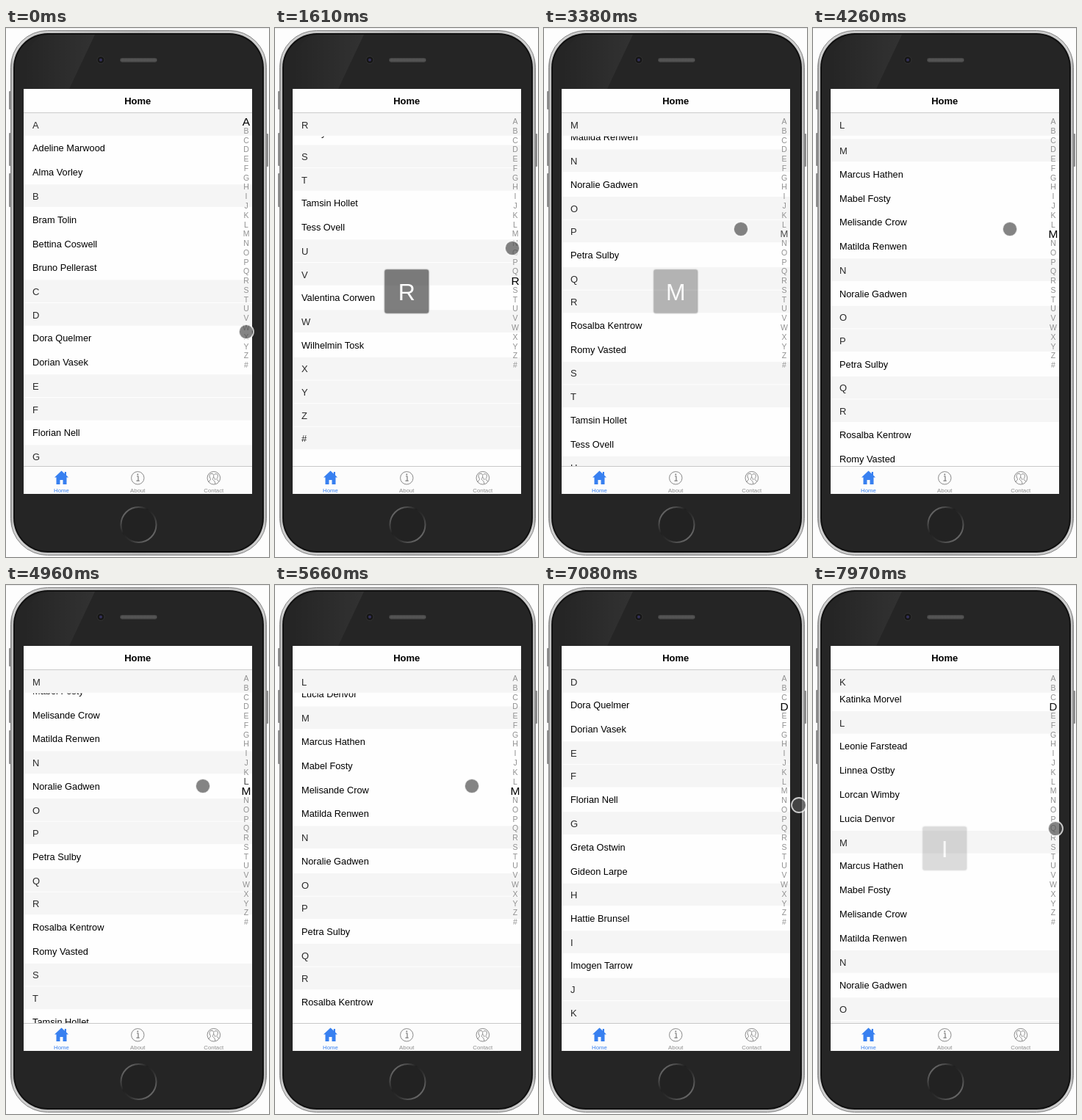
An HTML page for the animation above (8 s loop, 358 px wide and 721 px high).

```html
<!DOCTYPE html>
<html lang="en">
<head>
<meta charset="utf-8">
<title>Indexed contact list</title>
<style>
  html, body { margin: 0; width: 100%; height: 100%; overflow: hidden; background: #fdfdfd; }
  svg { display: block; font-family: "Liberation Sans", Arial, sans-serif; }
  .name { font-size: 12.8px; fill: #000; }
  .heading { font-size: 13px; fill: #2a2a2a; }
  .middle { text-anchor: middle; }
  .tab { font-size: 7.8px; fill: #8e8e8e; text-anchor: middle; }
  .icon { fill: none; stroke: #7c7c7c; stroke-width: .9; }
</style>
</head>
<body>
<svg width="358" height="721" viewBox="0 0 358 721">
  <defs>
    <linearGradient id="rim" x2="1" y2="0">
      <stop offset="0" stop-color="#969696"/><stop offset=".01" stop-color="#d0d0d0"/>
      <stop offset=".5" stop-color="#b4b4b4"/>
      <stop offset=".99" stop-color="#d0d0d0"/><stop offset="1" stop-color="#969696"/>
    </linearGradient>
    <linearGradient id="ring" x2="1" y2="1">
      <stop offset="0" stop-color="#8a8a8a"/><stop offset=".4" stop-color="#202020"/>
      <stop offset=".6" stop-color="#303030"/><stop offset="1" stop-color="#858585"/>
    </linearGradient>
    <linearGradient id="shine" x2="1" y2="0">
      <stop offset="0" stop-color="#fff" stop-opacity="0"/>
      <stop offset="1" stop-color="#fff" stop-opacity=".06"/>
    </linearGradient>
    <pattern id="mesh" width="2" height="2" patternUnits="userSpaceOnUse">
      <rect width="2" height="2" fill="#4a4a4a"/><rect width="1" height="1" fill="#6c6c6c"/>
    </pattern>
    <clipPath id="viewport"><rect x="24" y="116" width="311" height="481.5"/></clipPath>
  </defs>

  <!-- Phone -->
  <path d="M0 .5H358" stroke="#ececec"/>
  <g fill="#8d8d8d">
    <rect x="4" y="86" width="4" height="25" rx="1"/>
    <rect x="4" y="143" width="4" height="45" rx="1"/>
    <rect x="4" y="198" width="4" height="46" rx="1"/>
    <rect x="353" y="144" width="4" height="45" rx="1"/>
  </g>
  <rect x="6.5" y="3.5" width="348" height="715" rx="50" fill="url(#rim)" stroke="#858585"/>
  <rect x="10" y="7" width="341" height="708" rx="47" fill="#111"/>
  <rect x="12" y="9" width="337" height="704" rx="45" fill="#252525"/>
  <path d="M58 9H121L86 83H24V43Q34 13 58 9Z" fill="url(#shine)"/>
  <circle cx="129" cy="43.5" r="5" fill="#161616" stroke="#343434"/>
  <circle cx="129" cy="43.5" r="2" fill="#34315c"/>
  <rect x="155.5" y="41" width="50" height="5.5" rx="2.7" fill="url(#mesh)" stroke="#3c3c3c" stroke-width=".6"/>
  <circle cx="180.5" cy="677" r="24" fill="#222" stroke="url(#ring)" stroke-width="2"/>

  <!-- Screen -->
  <rect x="24" y="83" width="311" height="552" fill="#fefefe"/>
  <text class="middle" x="179.3" y="104" font-size="13" font-weight="bold">Home</text>
  <g clip-path="url(#viewport)">
    <g id="list"></g>
    <g id="sticky"></g>
    <g id="index"></g>
  </g>
  <path d="M24 115.5H335" stroke="#cbcbcb"/>
  <rect x="24" y="598" width="311" height="37" fill="#fcfcfc"/>
  <path d="M24 597.5H335" stroke="#c8c8c8"/>
  <path d="M75.5 603.5L66 612.5H68.5V622H73.5V616H77.5V622H82.5V612.5H85L82 609.6V605H79.8V607.5Z" fill="#3880f0"/>
  <text class="tab" x="75.5" y="633" style="fill:#3880f0">Home</text>
  <circle class="icon" cx="179.3" cy="613.3" r="8.7"/>
  <path d="M178 611H180V617M177.5 617.2H181.7" class="icon" style="stroke-width:1.2"/>
  <circle cx="179.3" cy="608.5" r="1" fill="#7c7c7c"/>
  <text class="tab" x="179.3" y="633">About</text>
  <g class="icon">
    <circle cx="282.8" cy="613.3" r="8.8"/>
    <path d="M276 619C276 616 279 617 278.4 614.5C276 611 277 607 280 607.3C283 607.3 283.6 611 281.4 614.5C281 617 284.5 616 284.7 621"/>
    <path d="M283.5 609C285 606.5 289 607.5 288.2 611.5C288 613.5 286.5 614 287 615.5C287.5 616.6 289 616.5 289.4 618M283.2 612.5C284 614 284.8 614 284.6 616"/>
  </g>
  <text class="tab" x="282.8" y="633">Contact</text>

  <g id="bubble">
    <rect x="148.5" y="328.5" width="61.5" height="61" rx="4" fill="#000" fill-opacity=".5" stroke="#e2e2e2" stroke-opacity=".75" stroke-width="1.6"/>
    <text class="middle" x="179.3" y="370.5" font-size="32" fill="#fff"></text>
  </g>
  <circle id="pointer" r="10" fill="#505050" fill-opacity=".7" stroke="#fff" stroke-opacity=".75" stroke-width="1.8"/>
</svg>

<script>
const LOOP = 8000, STEP = 177.1;
const TOP = 116, HEADING = 31.6, ROW = 32.85;
const LETTERS = [..."ABCDEFGHIJKLMNOPQRSTUVWXYZ#"];
const CONTACTS = [
  "Adeline Marwood", "Alma Vorley", "Bram Tolin", "Bettina Coswell", "Bruno Pellerast",
  "Dora Quelmer", "Dorian Vasek", "Florian Nell", "Greta Ostwin", "Gideon Larpe",
  "Hattie Brunsel", "Imogen Tarrow", "Katinka Morvel", "Leonie Farstead", "Linnea Ostby",
  "Lorcan Wimby", "Lucia Denvor", "Marcus Hathen", "Mabel Fosty", "Melisande Crow",
  "Matilda Renwen", "Noralie Gadwen", "Petra Sulby", "Rosalba Kentrow", "Romy Vasted",
  "Tamsin Hollet", "Tess Ovell", "Valentina Corwen", "Wilhelmin Tosk"
];

const $ = id => document.getElementById(id);
const clamp = v => Math.max(0, Math.min(1, v));

function add(parent, tag, attrs, text = "") {
  const node = document.createElementNS("http://www.w3.org/2000/svg", tag);
  for (const key in attrs) node.setAttribute(key, attrs[key]);
  node.textContent = text;
  return parent.appendChild(node);
}

function addHeading(parent, y, letter) {
  add(parent, "rect", { x: 24, y, width: 311, height: HEADING - 1, fill: "#f5f5f5" });
  return add(parent, "text", { class: "heading", x: 36, y: y + 20.6 }, letter);
}

// Build the sections and remember where each one starts.
const offset = {};
let contentY = 0;
for (const letter of LETTERS) {
  offset[letter] = contentY;
  addHeading($("list"), contentY, letter);
  contentY += HEADING;
  for (const name of CONTACTS.filter(n => n[0] === letter)) {
    add($("list"), "text", { class: "name", x: 36, y: contentY + 20.8 }, name);
    contentY += ROW;
  }
}
add($("sticky"), "rect", { x: 24, y: 0, width: 311, height: HEADING, fill: "#fefefe" });
const stickyLabel = addHeading($("sticky"), 0, "A");
const indexLabels = LETTERS.map(letter =>
  add($("index"), "text", { class: "middle", x: 327 }, letter));

// Tracks: [step, value, ...], linear between keys.
const { D, L, M, N, P, S } = offset;
const scrollTrack = [
  [5, 0], [7, S - 43.5], [10, S - 43.5], [11, P], [12, N], [17, N], [19, N - 49.5],
  [22, M], [25, L + 110], [28, N - 110.5], [30, N - 125], [34, N - 300],
  [37, N - 462], [40, D], [43, D], [45, N - 382]
];
const pointerTrack = [
  [0, 327, 414], [3, 329, 439], [5, 329, 439], [9, 323, 300], [13, 326, 235],
  [16, 268, 274], [37, 268, 274], [40, 347, 300], [42, 347, 310], [45, 330, 332]
];
const bubbleTrack = [[5, 0], [6, 1], [17, 1], [19, .53], [21, 0], [44, 0], [45, .27]];

// Highlighted index letters: [letter, from, to].
const highlights = [
  ["A", -2, 5], ["Z", 5, 6], ["V", 6, 7], ["R", 8, 10], ["P", 10, 10.9], ["N", 12, 16.5],
  ["M", 19, 24], ["L", 25, 27], ["M", 27, 34], ["L", 34.5, 35.8], ["K", 35.5, 36], ["D", 39, 44.8]
];

function sample(track, step, column = 1) {
  const next = track.findIndex(key => key[0] > step);
  if (next === 0) return track[0][column];
  if (next < 0) return track[track.length - 1][column];
  const a = track[next - 1], b = track[next];
  return a[column] + (b[column] - a[column]) * (step - a[0]) / (b[0] - a[0]);
}

function emphasis(letter, step) {
  return Math.max(0, ...highlights.filter(h => h[0] === letter && step >= h[1])
    .map(([, from, to]) => Math.min(clamp((step - from) / 2 + .5), clamp(1 - (step - to) / 2))));
}

function draw(step) {
  const scroll = sample(scrollTrack, step);
  $("list").setAttribute("transform", `translate(0 ${TOP - scroll})`);

  const current = LETTERS.filter(l => offset[l] <= scroll + .01).pop();
  const following = LETTERS[LETTERS.indexOf(current) + 1];
  const push = following ? Math.min(0, offset[following] - scroll - HEADING) : 0;
  stickyLabel.textContent = current;
  $("sticky").setAttribute("transform", `translate(0 ${TOP + push})`);

  indexLabels.forEach((label, i) => {
    const weight = emphasis(LETTERS[i], step);
    const size = 10.5 + 5 * weight;
    const shade = Math.round(145 * (1 - weight));
    label.setAttribute("font-size", size);
    label.setAttribute("fill", `rgb(${shade},${shade},${shade})`);
    label.setAttribute("y", 127.3 + i * 12.77 + size * .36);
  });

  const lastTouched = highlights.filter(h => h[1] <= step).pop()[0];
  $("bubble").setAttribute("opacity", sample(bubbleTrack, step));
  $("bubble").lastElementChild.textContent = step > 40 ? "I" : lastTouched;

  $("pointer").setAttribute("cx", sample(pointerTrack, step));
  $("pointer").setAttribute("cy", sample(pointerTrack, step, 2));
}

function tick() {
  const time = performance.now() % LOOP;
  draw(Math.floor((time + 14) / STEP));
  requestAnimationFrame(tick);
}
tick();
</script>
</body>
</html>
```
